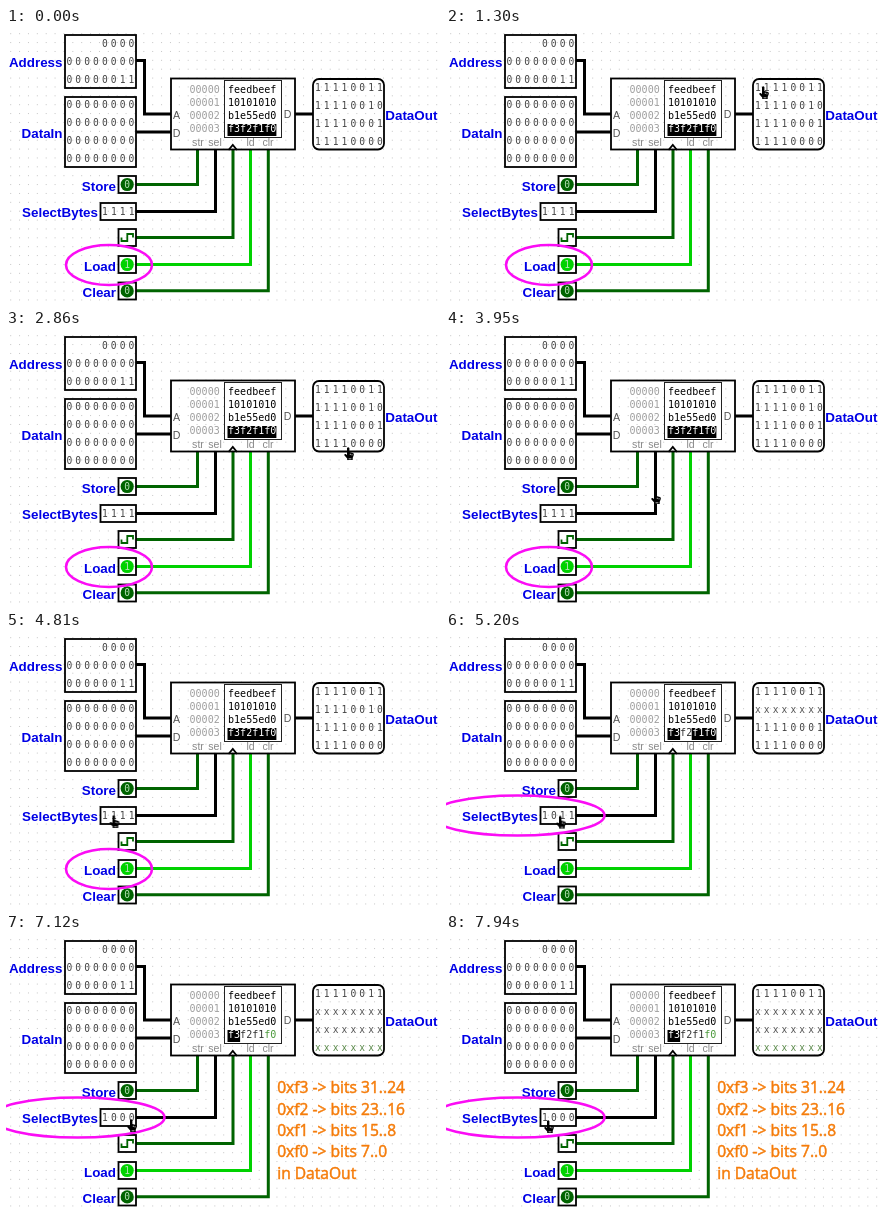
Animation of 434x274 px, one loop 8 s. Source, as an HTML page:

```html
<!DOCTYPE html>
<html lang="en">
<head>
<meta charset="utf-8">
<title>Memory byte select</title>
<style>
@property --n { syntax: "<number>"; inherits: true; initial-value: 0; }
html, body { margin: 0; width: 100%; height: 100%; overflow: hidden; background: #fff; }
svg { display: block; width: 434px; height: 274px; animation: state 8s step-end infinite; }

/* --n counts the changes so far; .on appears after change --i, .off leaves then */
@keyframes state {
  0% { --n: 0; }
  61% { --n: 1; }
  63% { --n: 2; }
  65.9% { --n: 3; }
  68.8%, to { --n: 4; }
}
.on { opacity: clamp(0, var(--n) - var(--i), 1); }
.off { opacity: clamp(0, 1 + var(--i) - var(--n), 1); }

.label { font: bold 13.4px "Liberation Sans", Arial, sans-serif; fill: #0000e6; }
.bit { font: 9.6px "DejaVu Sans Mono", monospace; text-anchor: middle; fill: #444; }
.port { font: 10.6px "Liberation Sans", Arial, sans-serif; text-anchor: middle; fill: #888; }
.mono { font: 10.05px "DejaVu Sans Mono", monospace; }
.note { font: 15.6px "Open Sans", "Noto Sans", sans-serif; fill: #f57c0a; stroke: #f57c0a; stroke-width: .5; }
.end { text-anchor: end; }
.box { fill: none; stroke: #000; stroke-width: 1.8; }
.wire { fill: none; stroke: #006400; stroke-width: 3; }
.bus { stroke: #000; }
.high { stroke: #00d200; }
.wave { stroke-width: 1.8; }
.ring { fill: none; stroke: #fb0cf5; stroke-width: 2.6; }

#hand { animation: move 8s step-end infinite; }
@keyframes move {
  0% { transform: translate(346px, 290px); }
  7.5% { transform: translate(346px, 256px); animation-timing-function: steps(4); }
  11.5% { transform: translate(295px, 128px); }
  13.375% { transform: translate(298px, 112px); animation-timing-function: steps(3); }
  16.25% { transform: translate(313px, 58px); animation-timing-function: steps(1); }
  17.25% { transform: translate(337px, 48px); animation-timing-function: steps(2); }
  19.25% { transform: translate(383px, 62px); animation-timing-function: steps(2); }
  21.25% { transform: translate(379px, 98px); animation-timing-function: steps(2); }
  23.25% { transform: translate(360px, 119px); }
  24.125% { transform: translate(347px, 123px); }
  25.125% { transform: translate(331px, 119px); animation-timing-function: steps(2); }
  27% { transform: translate(305px, 84px); animation-timing-function: steps(2); }
  29% { transform: translate(318px, 43px); }
  30% { transform: translate(340px, 35px); animation-timing-function: steps(2); }
  32% { transform: translate(375px, 65px); animation-timing-function: steps(2); }
  33.875% { transform: translate(355px, 97px); }
  35.125% { transform: translate(346px, 108px); }
  35.75% { transform: translate(338px, 117px); }
  42.5% { transform: translate(316px, 124px); animation-timing-function: steps(4); }
  46.25% { transform: translate(212px, 159px); }
  49.375% { transform: translate(205px, 161px); animation-timing-function: steps(10); }
  59.125% { transform: translate(104px, 182px); }
  60.125% { transform: translate(103.5px, 183px); }
  63% { transform: translate(105px, 183px); animation-timing-function: steps(7); }
  69.75% { transform: translate(122.5px, 185px); }
  89% { transform: translate(121px, 185px); animation-timing-function: steps(4); }
  93% { transform: translate(111px, 184px); animation-timing-function: steps(5); }
  98.25% { transform: translate(99px, 186px); }
  99.25%, to { transform: translate(98px, 186px); }
}
</style>
</head>
<body>
<svg viewBox="0 0 434 274">
  <defs>
    <pattern id="grid" x="4.2" y="5.2" width="8.875" height="8.875" patternUnits="userSpaceOnUse">
      <rect width="1" height="1" fill="#c4c4c4"/>
    </pattern>
  </defs>
  <rect width="434" height="274" fill="#fff"/>
  <rect width="434" height="274" fill="url(#grid)"/>

  <g class="wire">
    <path class="bus" d="M130 32.5H138.5V86H165M130 104H165M289 86H307M130 183.5H209.5V122"/>
    <path d="M130 156.5H191.5V122M130 209.5H227V122M130 262.8H262.3V122"/>
    <path class="high" d="M130 236.5H244.5V122"/>
  </g>

  <g class="box">
    <rect x="59" y="7" width="71" height="53"/>
    <rect x="59" y="69" width="71" height="70"/>
    <rect x="94.5" y="175" width="35.5" height="17"/>
    <rect x="112.5" y="148" width="17.5" height="17"/>
    <rect x="112.5" y="201" width="17.5" height="17"/>
    <rect x="112.5" y="228" width="17.5" height="17"/>
    <rect x="112.5" y="254.5" width="17.5" height="17"/>
    <rect x="307" y="51" width="71" height="70.5" rx="6"/>
    <rect x="165" y="50.5" width="124" height="71"/>
    <path d="M222.5 122L226.8 117L231 122"/>
  </g>
  <path class="wire wave" d="M115.5 209.5V213H121.3V206H127V209.5"/>

  <g id="lamps"></g>
  <g id="bits" class="bit"></g>

  <g class="port">
    <g fill="#555"><text x="170.5" y="91">A</text><text x="170.5" y="109">D</text><text x="281.5" y="90">D</text></g>
    <text x="192" y="118">str</text><text x="209" y="118">sel</text>
    <text x="244.5" y="118">ld</text><text x="262" y="118">clr</text>
  </g>

  <rect x="218.5" y="52.5" width="57" height="57" fill="#fff" stroke="#222"/>
  <g id="memory" class="mono"></g>

  <g class="label">
    <g class="end">
      <text x="56.5" y="39">Address</text><text x="56.5" y="110">DataIn</text>
      <text x="110" y="162.5">Store</text><text x="92" y="189">SelectBytes</text>
      <text x="110" y="242.5">Load</text><text x="110" y="269">Clear</text>
    </g>
    <text x="379.3" y="92">DataOut</text>
  </g>

  <ellipse class="ring off" style="--i:0" cx="103" cy="237" rx="43" ry="20"/>
  <ellipse class="ring on" style="--i:0" cx="71.5" cy="183.5" rx="87" ry="20"/>

  <g class="note on" style="--i:2">
    <text x="271.2" y="159.3">0xf3 -&gt; bits 31..24</text>
    <text x="271.2" y="180.6">0xf2 -&gt; bits 23..16</text>
    <text x="271.2" y="201.9">0xf1 -&gt; bits 15..8</text>
    <text x="271.2" y="223.2">0xf0 -&gt; bits 7..0</text>
    <text x="271.2" y="244.5">in DataOut</text>
  </g>

  <g id="hand">
    <path d="M3 1Q4.2-.4 5.4 1V5L9 6Q10 6.4 9.8 8L8.7 11V13H3.2V11.4L.3 8.2Q.2 6.6 1.6 7L3 8Z"/>
    <path d="M6.3 6.7V8M8 7.2V8.4M4.6 11.8H7.4" stroke="#fff" stroke-width=".7"/>
  </g>
</svg>
<script>
const STEP = 8.875;
const add = (id, html) => document.getElementById(id).insertAdjacentHTML("beforeend", html);
const text = (x, y, s, extra = "") => `<text x="${x}" y="${y}" ${extra}>${s}</text>`;
const when = (kind, i, css = "") => `class="${kind}" style="--i:${i};${css}"`;

// one row of evenly spaced digits, ending at column x
function row(x, y, digits, extra) {
  const xs = [...digits].map((_, k) => x - (digits.length - 1 - k) * STEP);
  add("bits", text(xs.join(" "), y, digits, extra));
}

["0000", "00000000", "00000011"].forEach((s, k) => row(125.4, 19.3 + k * 2 * STEP, s));
for (let k = 0; k < 4; k++) row(125.4, 80.3 + k * 2 * STEP, "00000000");

["11110011", "11110010", "11110001", "11110000"].forEach((s, k) => {
  const y = 63.4 + k * 2 * STEP;
  row(374, y, s, k ? when("off", k) : "");
  if (k) row(374, y, "xxxxxxxx", when("on", k, `fill:${k === 3 ? "#5c8a4c" : "#555"}`));
});

for (let k = 0; k < 4; k++) {
  const x = 98.9 + k * STEP;
  row(x, 187, "1", k ? when("off", k) : "");
  if (k) row(x, 187, "0", when("on", k));
}

for (const [y, v] of [[156.5, 0], [236.5, 1], [262.9, 0]]) {
  add("lamps", `<circle cx="121.2" cy="${y}" r="6.6" fill="${v ? "#00d200" : "#006400"}"/>` +
    text(121.2, y + 3.5, v, 'class="bit" style="fill:#b4e0b4"'));
}

["feedbeef", "10101010", "b1e55ed0", ""].forEach((word, k) => {
  const y = 65 + k * 13;
  add("memory", text(183.5, y, "0000" + k, 'fill="#a0a0a0"') + text(222, y, word));
});

// selected bytes of the last word are shown inverted
["f3", "f2", "f1", "f0"].forEach((s, k) => {
  const x = 222 + k * 12.1;
  if (k) add("memory", `<g ${when("on", k)}>${text(x, 104, s, `fill="${k === 3 ? "#4c9a3c" : "#333"}"`)}</g>`);
  add("memory", `<g ${k ? when("off", k) : ""}><rect x="${x - 0.5}" y="96" width="12.6" height="12"/>` +
    text(x, 104, s, 'fill="#fff"') + "</g>");
});
</script>
</body>
</html>
```
